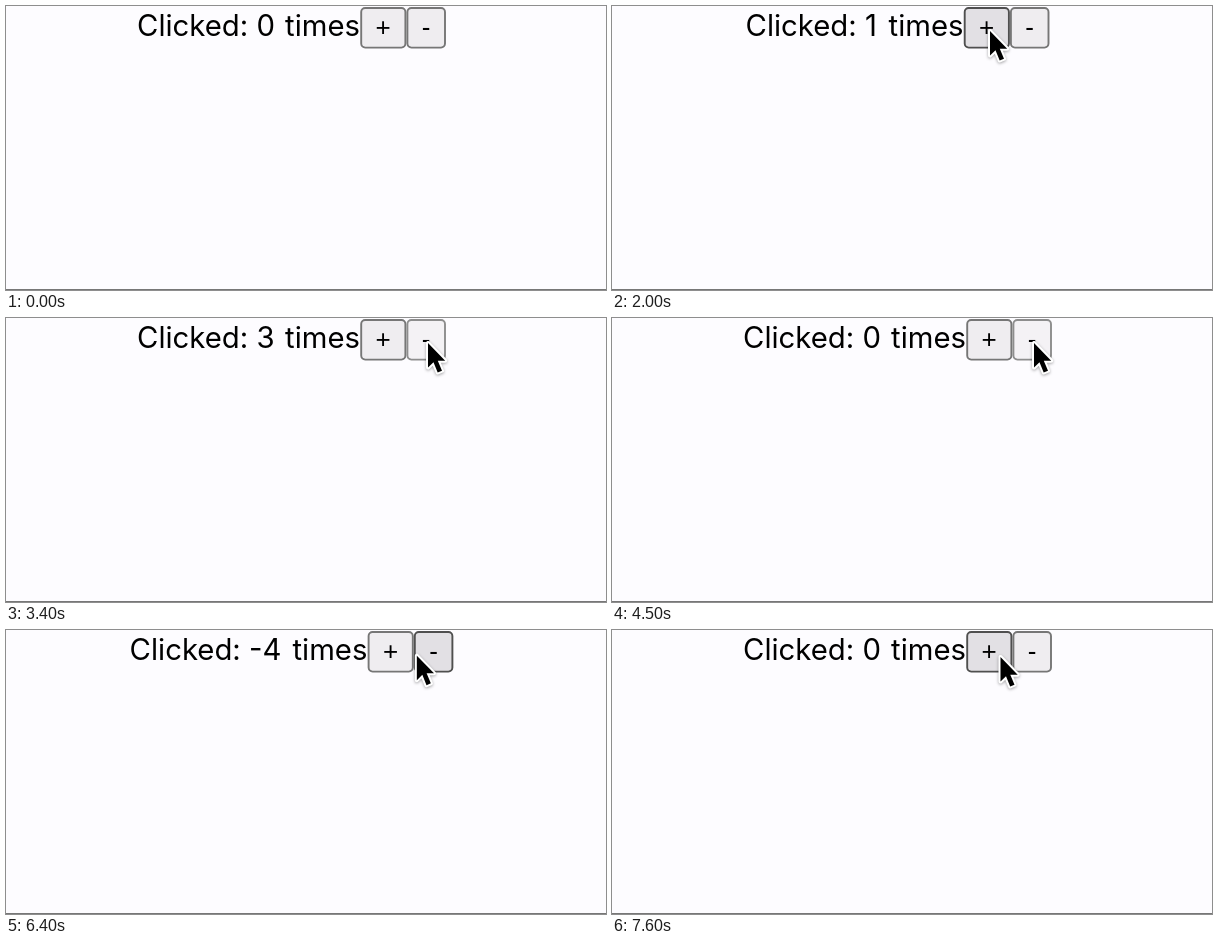
Animation of 600 by 284 pixels, one loop 8000 ms. Source, as an HTML page:

```html
<!DOCTYPE html>
<html lang="en">
<head>
<meta charset="utf-8">
<title>Counter</title>
<style>
  html, body { margin: 0; width: 100%; height: 100%; overflow: hidden; background: #fdfcff; }
  svg { display: block; }
  .label { font: 29.3px Inter, sans-serif; font-optical-sizing: none; }
  .button text { font: 26px "Liberation Sans", Arial, sans-serif; text-anchor: middle; }
  .button rect { fill: #efedf0; stroke: #767676; stroke-width: 1.9; }
  .hover rect { fill: #e2e0e4; stroke: #4f4f4f; }
  .active rect { fill: #f4f2f5; stroke: #8d8d8d; }
  #cursor { stroke: #fff; stroke-width: 4; stroke-linejoin: round; paint-order: stroke;
    filter: drop-shadow(0 1.5px 1.5px rgba(0, 0, 0, .35)); }
</style>
</head>
<body>
<svg width="600" height="284" viewBox="0 0 600 284">
  <rect y="283" width="600" height="1" fill="#777"/>
  <text id="count" class="label" y="30"></text>
  <text id="times" class="label" y="30" text-anchor="end">times</text>
  <g id="plus" class="button">
    <rect x="1" y="2" width="44.2" height="39.6" rx="4"/>
    <text x="23" y="30">+</text>
  </g>
  <g id="minus" class="button">
    <rect x="1" y="2" width="37.6" height="39.6" rx="4"/>
    <text x="19.8" y="30">-</text>
  </g>
  <path id="cursor" d="M0 0V24.5L5.5 19.2L9.7 29.5L14 27.7L9.8 17.7H17.2Z"/>
</svg>
<script>
const LOOP = 8000, STEP = 100;
const $ = id => document.getElementById(id);
const [count, times, plus, minus, cursor] =
  ["count", "times", "plus", "minus", "cursor"].map($);

// Click times with the change each makes
const clicks = [
  ...[1700, 2200, 2500].map(t => [t, 1]),
  ...[3500, 3800, 4200, 4600, 4900, 5300, 5800].map(t => [t, -1]),
  ...[6800, 7100, 7300, 7600].map(t => [t, 1])
];
// These presses are too short to show
const quick = [1700, 7300];

// Pointer path: time, x, y
const path = [
  [300, 170, 262], [500, 250, 170], [700, 335, 95], [900, 405, 50],
  [1000, 423, 36], [1100, 418, 32], [1500, 378, 25],
  [2900, 378, 25], [3200, 422, 25],
  [6300, 422, 25], [6600, 388.5, 27], [LOOP, 388.5, 27]
];

// How far each side of the centred row moves out, by digit
const digitGrow = [0, -2.5, -0.6, 0, 0.4];

function pointer(t) {
  const i = path.findIndex(p => p[0] > t);
  if (i < 1) return null;
  const [a, b] = [path[i - 1], path[i]];
  const k = (t - a[0]) / (b[0] - a[0]);
  return { x: a[1] + (b[1] - a[1]) * k, y: a[2] + (b[2] - a[2]) * k };
}

function setButton(button, x, width, at, pressed) {
  const over = at && at.y < 42 && at.x >= x && at.x < x + width;
  button.setAttribute("transform", `translate(${x})`);
  button.setAttribute("class", "button" + (over ? pressed ? " active" : " hover" : ""));
}

function draw(now) {
  const t = Math.floor(now % LOOP / STEP) * STEP;
  const n = clicks.reduce((sum, [at, d]) => at <= t ? sum + d : sum, 0);
  const pressed = clicks.some(([at]) => at === t + STEP && !quick.includes(at));
  const grow = digitGrow[Math.abs(n)] + (n < 0 ? 7 : 0);
  const at = pointer(t);

  count.textContent = "Clicked: " + n;
  count.setAttribute("x", 131 - grow);
  times.setAttribute("x", 354 + grow);
  setButton(plus, 354.2 + grow, 46.2, at, pressed);
  setButton(minus, 400.4 + grow, 39.6, at, pressed);
  cursor.style.display = at ? "" : "none";
  if (at) cursor.setAttribute("transform", `translate(${at.x} ${at.y})`);
}

let start;
function tick(now) {
  start ??= now;
  draw(now - start);
  requestAnimationFrame(tick);
}
draw(0);
requestAnimationFrame(tick);
</script>
</body>
</html>
```
